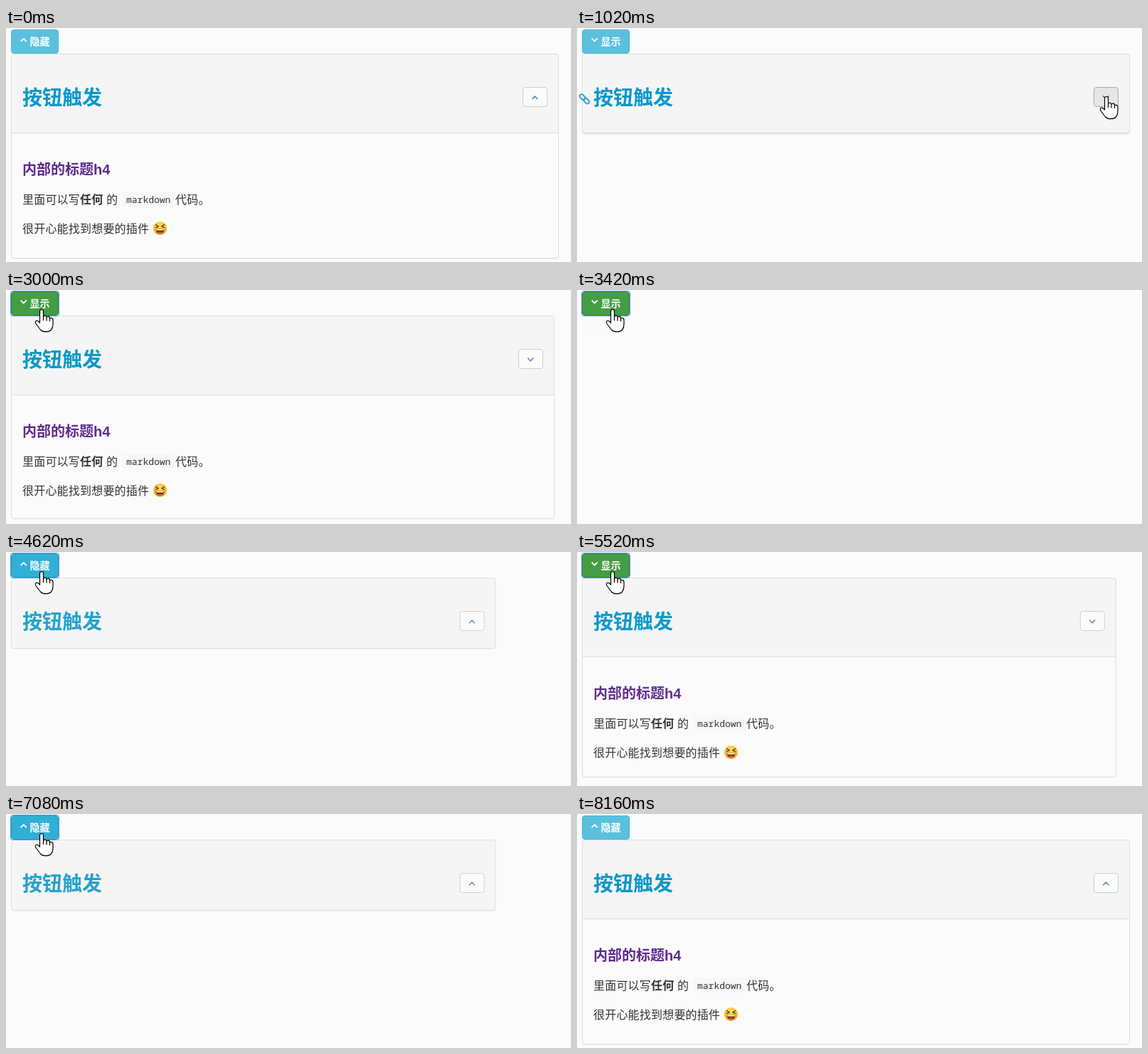
An HTML page for the animation above (8.22 s loop, 794 by 329 pixels).

```html
<!DOCTYPE html>
<html lang="zh-CN">
<head>
<meta charset="utf-8">
<title>按钮触发</title>
<style>
  html, body { margin: 0; width: 100%; height: 100%; overflow: hidden; background: #fbfbfb; }
  svg { display: block; width: 794px; height: 329px; }
  text { font-family: "Liberation Sans", "Noto Sans CJK SC", "Noto Sans CJK", sans-serif; fill: #333; white-space: pre; }
  .bold { font-weight: 700; }
  .para { font-size: 16px; letter-spacing: .2px; }
  .code { font: 13px "Noto Sans Mono", "Liberation Mono", monospace; }
  .line { fill: none; stroke-linecap: round; stroke-linejoin: round; }
</style>
</head>
<body>
<svg viewBox="0 0 794 329">
  <defs>
    <clipPath id="panelClip"><rect id="panelBox" x="7" y="36" rx="4"/></clipPath>
    <clipPath id="bodyClip"><rect id="bodyBox" x="7" y="148" width="770"/></clipPath>
    <radialGradient id="face" cx=".5" cy=".35" r=".7">
      <stop offset="0" stop-color="#ffe257"/>
      <stop offset=".6" stop-color="#fbc234"/>
      <stop offset="1" stop-color="#e58a1c"/>
    </radialGradient>
  </defs>

  <g id="panel">
    <rect id="shadow" x="7" y="37" rx="4" fill="#000" opacity=".05"/>
    <g clip-path="url(#panelClip)">
      <rect x="7" y="36" width="770" height="288" fill="#fbfbfb"/>
      <rect x="7" y="36" width="770" height="111" fill="#f5f5f5"/>
      <rect x="7" y="147" width="770" height="1" fill="#ddd"/>
      <text class="bold" x="23" y="107.5" font-size="28" style="fill:#0a97cb">按钮触发</text>
      <g id="toggle">
        <rect id="toggleBox" x="726.5" y="83.5" width="34" height="27" rx="3.5"/>
        <path id="toggleIcon" class="line" stroke-width="1.5"/>
      </g>
      <g clip-path="url(#bodyClip)">
        <text class="bold" x="23" y="206" font-size="20" style="fill:#5d2b8c">内部的标题h4</text>
        <text class="para" x="23" y="246.5">里面可以写<tspan class="bold">任何</tspan> 的</text>
        <rect x="163" y="231" width="74" height="20" rx="3" fill="#f7f7f7"/>
        <text class="code" x="169" y="246">markdown</text>
        <text class="para" x="238" y="246.5">代码。</text>
        <text class="para" x="23" y="287.5">很开心能找到想要的插件</text>
        <g transform="translate(216.5 281.5)">
          <circle r="9.6" fill="url(#face)"/>
          <path class="line" stroke="#6b3a12" stroke-width="1.4" d="M-6-4.8L-2.2-2.7L-6-.8M6-4.8L2.2-2.7L6-.8"/>
          <path fill="#6b2f12" d="M-6 1.2H6Q5.6 7.4 0 7.4T-6 1.2Z"/>
          <path fill="#fff" d="M-5.2 1.4H5.2L4.8 3H-4.8Z"/>
          <path fill="#e8503c" d="M-3.6 6Q0 3.4 3.6 6Q0 8.2-3.6 6Z"/>
        </g>
      </g>
    </g>
    <rect id="border" x="7.5" y="36.5" rx="3.5" fill="none" stroke="#ddd"/>
  </g>

  <g id="link" class="line" stroke="#0a97cb" stroke-width="1.6">
    <rect x="-4.2" y="-2.7" width="8.4" height="5.4" rx="2.5" transform="translate(7.6 97) rotate(45)"/>
    <rect x="-4.2" y="-2.7" width="8.4" height="5.4" rx="2.5" transform="translate(13.4 102.6) rotate(45)"/>
  </g>

  <rect id="focus" x="6.5" y="1.5" width="68" height="35" rx="3" fill="none" stroke="#5b9bea"/>
  <rect id="main" x="7.5" y="2.5" width="66" height="33" rx="3.5"/>
  <path id="mainIcon" class="line" stroke="#fff" stroke-width="1.7"/>
  <text id="label" class="bold" x="33.5" y="24.3" font-size="14" style="fill:#fff"></text>

  <g id="cursor" fill="#fff" stroke="#000" stroke-width="1.2" stroke-linejoin="round">
    <path id="arrow" d="M.5.5V24L5.6 19L9.2 27L12.6 25.5L9.2 17.5H17Z"/>
    <g id="hand">
      <path d="M-2.5 2Q-2.5-.5 0-.5T2.5 2V10Q3 8 5 8Q7 8.3 7 10.5Q8 9 9.5 9.2Q11.5 9.5 11.5 12Q12.5 11 13.8 11.3Q16 11.8 16 14.5V20Q16 25 13.5 28Q11 30.7 6 30.7T-1.5 28L-8.3 19Q-9.2 16.5-7.8 15.5Q-6 14.5-4 16.5L-2.5 18Z"/>
      <path fill="none" d="M2.5 10V15M7 10.5V15.5M11.5 12V16"/>
    </g>
  </g>
</svg>

<script>
const LOOP = 8220, STEP = 60;
const FULL_W = 770, OPEN_H = 288, CLOSED_H = 113, BODY_H = OPEN_H - CLOSED_H;
const SLIDE = 470, FADE = 545;

const el = {};
document.querySelectorAll('[id]').forEach(n => el[n.id] = n);

const set = (node, attrs) => {
  for (const k in attrs) node.setAttribute(k, attrs[k]);
};
const show = (node, on) => set(node, { visibility: on ? 'visible' : 'hidden' });
const progress = (t, start, len) => Math.min(1, Math.max(0, (t - start) / len));
const within = (t, a, b) => t >= a && t < b;
const swing = p => 0.5 - Math.cos(p * Math.PI) / 2;

// CSS "ease": cubic-bezier(.25, .1, .25, 1)
function ease(x) {
  let lo = 0, hi = 1;
  for (let i = 0; i < 20; i++) {
    const s = (lo + hi) / 2;
    const bx = 0.75 * s * (1 - s) + s ** 3;
    if (bx < x) lo = s; else hi = s;
  }
  return 0.3 * lo * (1 - lo) ** 2 + 3 * lo * lo * (1 - lo) + lo ** 3;
}

// Body collapse toggles: [time, open]
const slides = [[565, 0], [1590, 1], [2969, 0], [4195, 1], [5465, 0], [6655, 1]];
// Whole panel toggles: [time, visible]
const fades = [[2969, 0], [4195, 1], [5465, 0], [6655, 1]];
// Presses on the main button: [down, up]
const presses = [[2940, 3000], [4080, 4200], [5400, 5520], [6480, 6660]];
// Pointer: [time, x, y]
const route = [
  [40, 796, 53], [120, 779, 66], [240, 757, 85], [400, 744, 97],
  [2040, 744, 97], [2160, 590, 92], [2280, 330, 83], [2390, 207, 76],
  [2410, 207, 76], [2580, 128, 54], [2750, 50, 28],
  [7200, 50, 28], [7380, 230, 42], [7620, 714, 40], [7790, 800, 32]
];

const last = (list, t) => list.filter(e => e[0] <= t).pop();

function pointer(t) {
  const i = route.findIndex(p => p[0] > t);
  if (i < 1) return null;
  const [t0, x0, y0] = route[i - 1], [t1, x1, y1] = route[i];
  const p = (t - t0) / (t1 - t0);
  return { x: x0 + (x1 - x0) * p, y: y0 + (y1 - y0) * p };
}

const hit = (p, x0, y0, x1, y1) => !!p && within(p.x, x0, x1) && within(p.y, y0, y1);

const chevron = (x, y, up) => {
  const d = up ? -1.9 : 1.9;
  return `M${x - 3.6} ${y - d}L${x} ${y + d}L${x + 3.6} ${y - d}`;
};

function drawPanel(t, open, onToggle) {
  const slide = last(slides, t);
  let body = open ? 1 : 0;
  if (slide) {
    const p = ease(progress(t, slide[0], SLIDE));
    body = slide[1] ? p : 1 - p;
  }
  const bodyH = BODY_H * body;
  let k = 1, w = FULL_W, h = CLOSED_H + bodyH;
  const fade = last(fades, t);
  if (fade) {
    const p = progress(t, fade[0], FADE);
    k = fade[1] ? swing(p) : 1 - swing(p);
    // Height is measured before the body starts to move
    if (p < 1) h = (fade[1] ? CLOSED_H : OPEN_H) * k;
    w = FULL_W * k;
  }
  show(el.panel, k > 0.01);
  set(el.panel, { opacity: k });
  const size = { width: w, height: h };
  set(el.panelBox, size);
  set(el.shadow, size);
  set(el.border, { width: Math.max(0, w - 1), height: Math.max(0, h - 1) });
  set(el.bodyBox, { height: bodyH });
  set(el.toggle, { transform: `translate(${w - FULL_W} 0)` });
  set(el.toggleBox, { fill: onToggle ? '#e6e6e6' : '#fbfbfb', stroke: onToggle ? '#adadad' : '#ccc' });
  set(el.toggleIcon, { d: chevron(743.3, 97.8, open), stroke: onToggle ? '#444' : '#5585c8' });
}

function drawMain(t, open, onMain) {
  const fade = last(fades, t);
  const green = fade && !fade[1];
  const pressed = presses.some(p => within(t, ...p));
  const focused = within(t, 2940, 8160);
  const mood = pressed ? 2 : onMain || focused ? 1 : 0;
  const fills = green ? ['#5cb85c', '#449d44', '#398439'] : ['#5bc0de', '#31b0d5', '#269abc'];
  const edges = green ? ['#4cae4c', '#398439', '#255625'] : ['#46b8da', '#269abc', '#1b6d85'];
  set(el.main, { fill: fills[mood], stroke: edges[mood] });
  show(el.focus, focused);
  set(el.mainIcon, { d: chevron(24.7, 16.8, open) });
  el.label.textContent = open ? '隐藏' : '显示';
}

function draw(t) {
  const slide = last(slides, t);
  const open = !slide || !!slide[1];
  const p = pointer(t);
  const onMain = hit(p, 7, 2, 74, 36);
  const onToggle = hit(p, 726, 83, 761, 111);

  drawPanel(t, open, onToggle);
  drawMain(t, open, onMain);
  show(el.link, hit(p, 23, 79, 762, 116));
  show(el.arrow, p && !onMain && !onToggle);
  show(el.hand, onMain || onToggle);
  if (p) set(el.cursor, { transform: `translate(${p.x} ${p.y})` });
}

const start = performance.now();
function tick() {
  const t = (performance.now() - start) % LOOP;
  draw(Math.floor(t / STEP) * STEP);
  requestAnimationFrame(tick);
}
tick();
</script>
</body>
</html>
```
